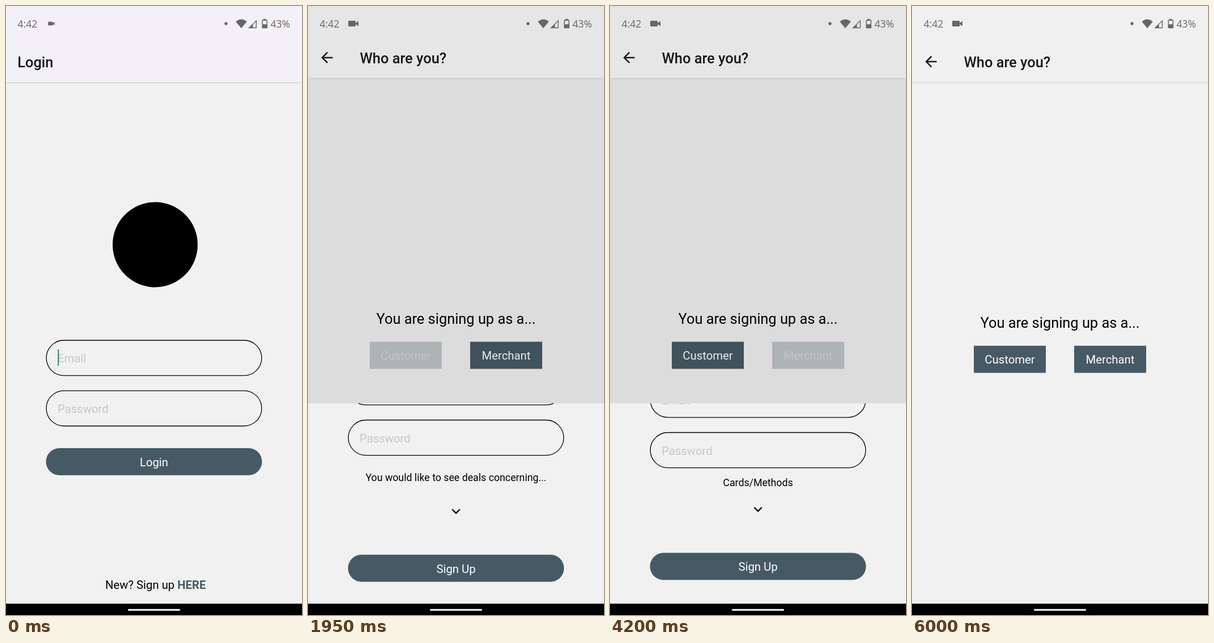
Animation of 522x1073 px, one loop 6060 ms. Source, as an HTML page:

```html
<!DOCTYPE html>
<html lang="en">
<head>
<meta charset="utf-8">
<title>Sign-up flow</title>
<style>
  html, body { margin: 0; width: 100%; height: 100%; overflow: hidden; background: #000; }
  #stage { position: relative; width: 522px; height: 1073px; overflow: hidden; }
  .clip { position: absolute; left: 0; top: 0; width: 522px; height: 1053px; overflow: hidden; }
  .card { position: absolute; inset: 0; background: #f1f1f1; --dim: 0; }
  .shade { position: absolute; inset: 0; background: #000; opacity: calc(var(--dim) * .093); }
  .bar { position: absolute; left: 0; top: 0; width: 522px; height: 134px; box-shadow: 0 1px 3px rgba(0, 0, 0, .17); }
  .bar::before { content: ""; position: absolute; inset: 0; background: #e6e6e6; opacity: var(--dim); }
  svg { position: absolute; left: 0; top: 0; display: block; }
  text { font-family: Roboto, "Noto Sans", sans-serif; font-size: 20.3px; }
  .title { font-size: 25.38px; font-weight: 500; fill: #161616; }
  .lead { font-size: 25.38px; }
  .note { font-size: 17.76px; }
  .hint { fill: #c8c8c8; }
  .mid { text-anchor: middle; }
  .btn text { fill: #fff; }
  .btn rect { fill: #465a65; }
  .btn.pressed { opacity: .29; }
  .btn.pressed text { fill: #949799; }
  .field { fill: none; stroke: #000; stroke-width: 1.3; }
  .icon { fill: #1a1a1a; }
  .status { fill: #666; }
  .status text { font-family: "Open Sans", "Noto Sans", sans-serif; font-size: 17.5px; font-weight: 500; }
</style>
</head>
<body>
<div id="stage"></div>
<script>
const LOOP = 6060, STEP = 60, H = 1053, DURATION = 425, DP = 1.2688;

// Markup helpers
const svg = (body, h = H) => `<svg width="522" height="${h}" viewBox="0 0 522 ${h}">${body}</svg>`;

const label = (cls, x, y, size, str) =>
  `<text class="${cls}" x="${x}" y="${y + size * .392}">${str}</text>`;

const icon = (x, y, d) =>
  `<path class="icon" transform="translate(${x} ${y}) scale(${DP})" d="${d}"/>`;

const field = (y, hint) =>
  `<rect class="field" x="71.1" y="${y}" width="379.8" height="62.2" rx="31.1"/>` +
  label('hint', 91, y + 31.1, 20.3, hint);

const button = (x, y, w, r, str, id = '') =>
  `<g class="btn" id="${id}"><rect x="${x}" y="${y}" width="${w}" height="47.8" rx="${r}"/>` +
  label('mid', x + w / 2, y + 23.9, 20.3, str) + '</g>';

const emblem = y => `<circle cx="263" cy="${y}" r="75"/>`;

const chevron = y => icon(245.8, y - 15.6, 'M7.41 8.59L12 13.17l4.59-4.58L18 10l-6 6-6-6z');

const back = icon(18.2, 82.8, 'M20 11H7.83l5.59-5.59L12 4l-8 8 8 8 1.41-1.41L7.83 13H20z');

const note = (y, str) => label('note mid', 261, y, 17.76, str);

function page(id, color, title, body) {
  const first = id === 'login';
  const head = (first ? '' : back) + label('title', first ? 20.3 : 91.5, 98.5, 25.38, title);
  return `<div class="clip" id="${id}"><div class="card">${svg(body)}<div class="shade"></div>` +
    `<div class="bar" style="background:${color}">${svg(head, 134)}</div></div></div>`;
}

const statusBar = `<g class="status">
  <text x="20.5" y="37.6">4:42</text>
  <path id="camera" d="M72 26h11q1 0 1 1v3l5-3.5v9l-5-3.5v3q0 1-1 1h-11q-1 0-1-1v-8q0-1 1-1z"/>
  <circle cx="388" cy="31" r="2.7"/>
  <path d="M405.3 27.4Q415 19.5 424.7 27.4L415 39.2z"/>
  <path d="M427 39.2L442 24.2V39.2zM435.5 32.5V37.8H440.6V27.5z" fill-rule="evenodd"/>
  <path d="M454 22.8h4.4v1.6h2.6v14.8h-9.6V24.4h2.6zM452.9 26v6.3h6.6V26z" fill-rule="evenodd"/>
  <text x="466.5" y="37.6">43%</text></g>`;

const navBar = '<rect y="1053" width="522" height="20"/>' +
  '<rect x="215" y="1062.4" width="92" height="3" rx="1.5" fill="#fff"/>';

document.getElementById('stage').innerHTML =
  page('login', '#f3f0f7', 'Login',
    emblem(420.5) + field(589, 'Email') + field(677.8, 'Password') +
    '<rect id="caret" x="91.2" y="605" width="2" height="29" fill="#10997f"/>' +
    button(70.5, 779, 381, 23.9, 'Login') +
    label('mid', 263.7, 1019.5, 20.3,
      'New? Sign up <tspan font-weight="700" fill="#465a65">HERE</tspan>')) +
  page('who', '#f0f0f0', 'Who are you?',
    label('lead mid', 261, 557.5, 25.38, 'You are signing up as a...') +
    button(109, 598.6, 127, 0, 'Customer', 'pickCustomer') +
    button(286, 598.6, 127, 0, 'Merchant', 'pickMerchant')) +
  page('customer', '#f0f0f0', 'Customer sign-up',
    emblem(347.5) + field(523.2, 'Name') + field(612, 'Email') + field(700.8, 'Password') +
    note(801.7, 'You would like to see deals concerning...') + chevron(862) +
    button(70.5, 938, 381, 23.9, 'Sign Up')) +
  page('merchant', '#edf3f8', 'Merchant sign-up',
    emblem(369.5) + field(545.2, 'Shop Name') + field(634, 'Email') + field(722.8, 'Password') +
    note(810.7, 'Cards/Methods') + chevron(858.5) +
    button(70.5, 934.8, 381, 23.9, 'Sign Up')) +
  svg(statusBar + navBar, 1073);

const el = id => document.getElementById(id);

// Cubic bezier (.20833, .82, .25, 1), solved by bisection
function ease(x) {
  if (x <= 0) return 0;
  if (x >= 1) return 1;
  const curve = (s, a, b) => 3 * (1 - s) ** 2 * s * a + 3 * (1 - s) * s * s * b + s ** 3;
  let lo = 0, hi = 1;
  for (let i = 0; i < 24; i++) {
    const s = (lo + hi) / 2;
    if (curve(s, .20833, .25) < x) lo = s; else hi = s;
  }
  return curve(lo, .82, 1);
}

// [first visible change, start of the curve]; the motion holds for STEP ms at a time
const moves = {
  who: { open: [680, 623] },
  customer: { open: [1950, 1912.75], close: [3170, 3211] },
  merchant: { open: [4200, 4162.75], close: [5640, 5600] }
};

const run = (t, [at, start]) =>
  t < at ? 0 : ease((at + Math.floor((t - at) / STEP) * STEP - start) / DURATION);

const progress = (t, { open, close }) => run(t, open) - (close ? run(t, close) : 0);

// A card is unveiled from the bottom while the one below drifts up and darkens
function place(id, p, next) {
  const clip = el(id), card = clip.firstChild;
  const top = Math.round(H * (1 - p));
  const shift = .041 * top - top - .02 * H * next;
  clip.style.visibility = top >= H ? 'hidden' : 'visible';
  clip.style.transform = `translateY(${top}px)`;
  card.style.transform = `translateY(${shift}px)`;
  card.style.setProperty('--dim', Math.min(1, next / .36));
}

const press = (id, t, at) => el(id).classList.toggle('pressed', t >= at && t < at + STEP);

function draw(t) {
  const who = progress(t, moves.who);
  const customer = progress(t, moves.customer);
  const merchant = progress(t, moves.merchant);
  place('login', 1, who);
  place('who', who, Math.max(customer, merchant));
  place('customer', customer, 0);
  place('merchant', merchant, 0);

  press('pickCustomer', t, 1950);
  press('pickMerchant', t, 4200);
  el('caret').style.opacity = t < 460 ? 1 : 0;

  const grow = Math.min(1, .64 + .09 * Math.floor(t / STEP));
  el('camera').setAttribute('transform', `translate(80 31) scale(${grow}) translate(-80 -31)`);
}

const begin = performance.now();
function tick() {
  draw((performance.now() - begin) % LOOP);
  requestAnimationFrame(tick);
}
tick();
</script>
</body>
</html>
```
